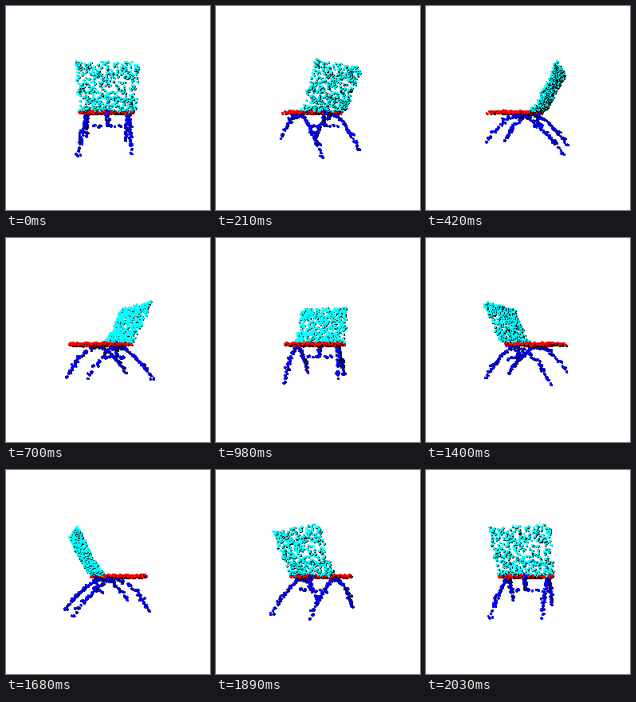
A matplotlib script for the animation above (2.1 s loop, 256 px wide and 256 px high).

```python
import numpy as np
import matplotlib.pyplot as plt
from matplotlib.animation import FuncAnimation

SIZE, DPI = 256, 100
FRAMES, STEP = 30, 70
CX, CY, DIST = 127, 133.5, 250
DOT = 2.2 * 72 / DPI
SHADE = np.array([0.5, 0.5])

rng = np.random.default_rng(12)


def cloud(x, y, z, jitter, color):
    pts = np.column_stack(np.broadcast_arrays(x, y, z)).astype(float)
    pts += rng.normal(0, jitter, pts.shape)
    return pts, np.tile(color, (len(pts), 1))


def backrest(n=440):
    t, u = rng.random(n), rng.uniform(-1, 1, n)
    return cloud(33 * u, 1 + 52 * t, 13 + 30 * t ** 0.8, 0.6, (0, 1, 1))


def seat(n=560):
    z, u = rng.uniform(-42, 14, n), rng.uniform(-1, 1, n)
    z[:6] -= rng.random(6) * 7
    half = 28 + 5 * (z + 42) / 56
    return cloud(half * u, 0, z, (0.4, 0.75, 0.4), (1, 0, 0))


def leg(foot_x, foot_z, power, n=50):
    u = rng.random(n) ** 1.15
    top = 26 * np.sign(foot_x)
    return cloud(top + (foot_x - top) * u, -3 - 40 * u ** power,
                 5 + (foot_z - 5) * u, 1.2, (0, 0, 1))


def brace():
    x = rng.uniform(-26, 26, 16)
    bar = cloud(x, -16 - 2 * (x / 26) ** 2, 14, 0.7, (0, 0, 1))
    post = cloud(0, rng.uniform(-16, 5, 24), 14, 1, (0, 0, 1))
    return [bar, post]


parts = [backrest(), seat(), *brace(),
         leg(-31, -45, 2.3), leg(27, -45, 2.3),
         leg(-29, 49, 1.3), leg(25, 49, 1.3)]
points = np.vstack([p for p, _ in parts])
colors = np.vstack([c for _, c in parts])

fig = plt.figure(figsize=(SIZE / DPI, SIZE / DPI), dpi=DPI, facecolor="white")
ax = fig.add_axes([0, 0, 1, 1])
ax.set(xlim=(0, SIZE), ylim=(SIZE, 0))
ax.axis("off")
dots = ax.scatter([], [], s=DOT ** 2, linewidths=0, antialiased=False)


def with_shade(under, over):
    """Interleave so each dot lies right on top of its own dark rim."""
    return np.stack((under, over), axis=1).reshape(-1, over.shape[1])


def update(i):
    a = 2 * np.pi * i / FRAMES
    x, y, z = points.T
    side = x * np.cos(a) + z * np.sin(a)
    depth = z * np.cos(a) - x * np.sin(a)
    scale = DIST / (DIST - depth)
    order = np.argsort(depth)
    screen = np.column_stack((CX + side * scale, CY - y * scale))[order]
    fill = colors[order]
    dots.set_offsets(with_shade(screen + SHADE, screen))
    dots.set_facecolors(with_shade(np.zeros_like(fill), fill))
    return (dots,)


anim = FuncAnimation(fig, update, frames=FRAMES, interval=STEP,
                     repeat=True, repeat_delay=0)
plt.show()
```
